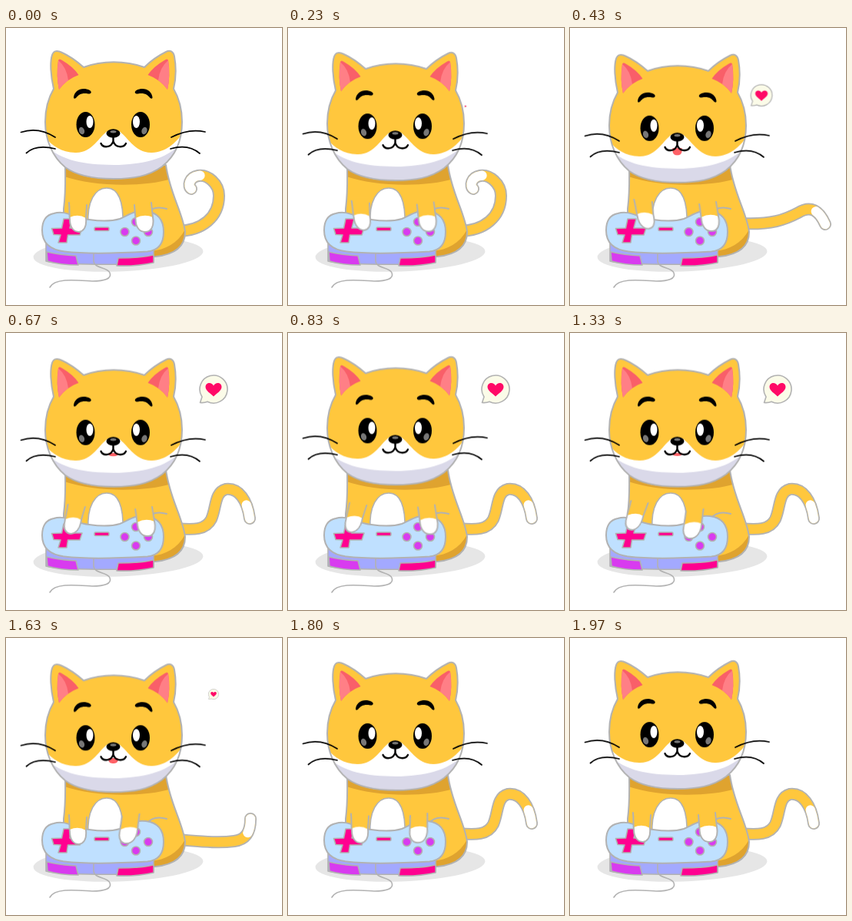
Recreate the animation shown at these times as an HTML page. Size 359 px wide and 360 px high, loop 2.01 s.

```html
<!DOCTYPE html>
<html lang="en">
<head>
<meta charset="utf-8">
<title>Cat playing a game</title>
<style>
  html, body { margin: 0; width: 100%; height: 100%; overflow: hidden; background: #fff; }
  svg { display: block; width: 100vw; height: 100vh; }

  .line { fill: none; stroke: #b2b2b2; stroke-width: 2; stroke-linecap: round; stroke-linejoin: round; }
  .ink { fill: none; stroke: #000; stroke-width: 1.7; stroke-linecap: round; stroke-linejoin: round; }
  .fur { fill: #ffc73d; }
  .shade { fill: #dfa32f; }
  .white { fill: #fff; }
  .edge { stroke: #b2b2b2; stroke-width: 1.6; stroke-linejoin: round; }
  .pink { fill: #ff0090; }
  .violet { fill: #d83bef; }
  .shell { fill: #bfe0ff; stroke: #b2b2b2; stroke-width: 2; }

  /* Head nods twice per loop; the mouth opens near the bottom of each nod. */
  .head { animation: nod 1005ms cubic-bezier(.37, 0, .63, 1) infinite; }
  @keyframes nod { 50% { transform: translateY(5px); } }
  .tongue { transform-origin: 139px 153px; animation: open 1005ms cubic-bezier(.37, 0, .63, 1) infinite; }
  @keyframes open {
    0%, 20%, 80%, 100% { transform: scaleY(0); }
    50% { transform: scaleY(1); }
  }

  .paw { animation: 2010ms ease-in-out infinite; }
  .paw.left { transform-origin: 94px 225px; animation-name: press-left; }
  .paw.right { transform-origin: 180px 225px; animation-name: press-right; }
  @keyframes press-left {
    0%, 98%, 100% { transform: translate(0, 0) skewX(0deg); }
    21.4% { transform: translate(1px, -4px) skewX(9deg); }
    33.3% { transform: translate(-1px, -4px) skewX(-13deg); }
    51.2%, 66.2% { transform: translate(-2px, -9px) skewX(-17deg); }
    81.1% { transform: translate(0, 3px) skewX(0deg); }
  }
  @keyframes press-right {
    0%, 98%, 100% { transform: translate(0, 0) skewX(0deg); }
    21.4%, 33.3% { transform: translate(1px, -1px) skewX(3deg); }
    51.2% { transform: translate(3px, -7px) skewX(3deg); }
    66.2%, 81.1% { transform: translate(-15px, 2px) skewX(-13deg); }
  }

  /* Tail poses swap hard: curl, wave, arch, low, arch, low, arch. */
  .tail { visibility: hidden; animation: 2010ms step-end infinite; }
  .tail path { fill: none; stroke-linecap: round; }
  .tail .rim { stroke: #b2b2b2; stroke-width: 16; }
  .tail .hair { stroke: #ffc73d; stroke-width: 12.4; }
  .tail .tip { stroke: #fff; stroke-width: 12.4; }
  .curl { animation-name: curl; }
  .wave { animation-name: wave; }
  .arch { animation-name: arch; }
  .low { animation-name: low; }
  @keyframes curl { 0% { visibility: visible; } 14.29%, 100% { visibility: hidden; } }
  @keyframes wave { 0% { visibility: hidden; } 14.29% { visibility: visible; } 28.57%, 100% { visibility: hidden; } }
  @keyframes arch {
    0%, 42.86%, 71.43% { visibility: hidden; }
    28.57%, 57.14%, 85.71%, 100% { visibility: visible; }
  }
  @keyframes low {
    0%, 57.14%, 85.71%, 100% { visibility: hidden; }
    42.86%, 71.43% { visibility: visible; }
  }

  .bubble { animation: bubble 2010ms linear infinite; }
  @keyframes bubble {
    0%, 10% { transform: translate(228px, 104px) scale(0); }
    21.4% { transform: translate(249px, 87.500px) scale(.77); }
    32%, 72% { transform: translate(270px, 73px) scale(1); }
    81.1% { transform: translate(270px, 73px) scale(.37); }
    86%, 100% { transform: translate(270px, 73px) scale(0); }
  }
</style>
</head>
<body>
<svg viewBox="0 0 359 360" preserveAspectRatio="none">
  <defs>
    <path id="body" d="M77 178C77 200 78 212 75 235V280C100 297 160 299 195 297C222 294 233 283 233 265C230 240 213 215 208 178Z"/>
    <path id="skull" d="M62 79C58 62 57 44 60 35C62 29 67 29 73 32C84 37 93 44 101 51C125 42 155 42 180 51C188 43 198 36 208 31C214 28 218 31 219 37C221 48 222 62 218 79C225 91 229 106 229 122C229 145 222 165 203 180C185 193 165 196 140 196C112 196 92 192 77 181C60 167 51 145 51 122C51 106 55 91 62 79Z"/>
    <clipPath id="in-body"><use href="#body"/></clipPath>
    <clipPath id="in-skull"><use href="#skull"/></clipPath>
  </defs>

  <ellipse cx="146" cy="294" rx="110.500" ry="22.500" fill="#e6e6e6" transform="rotate(-2 146 294)"/>

  <g id="tails"></g>

  <g>
    <use href="#body" class="fur"/>
    <g clip-path="url(#in-body)" class="shade">
      <path d="M70 175H215V196C180 207 110 207 70 191Z"/>
      <path d="M236 256C226 278 210 288 188 290V302H240Z"/>
    </g>
    <use href="#body" class="line"/>
    <path class="line" d="M183 241Q192 230 209 235"/>
    <path class="white edge" d="M107 256C105 225 116 208 131 208C146 208 153 225 152 256Z"/>
  </g>

  <g>
    <path fill="#a3a9ff" class="edge" d="M52 280V303C70 308 170 309 192 304V280Z"/>
    <path class="violet edge" d="M53 291Q70 295 91 296L94 308Q70 308 54 303Z"/>
    <path class="pink edge" d="M146 299Q175 299 192 295V305Q170 310 144 309Z"/>
    <path class="shell" d="M62 241C78 236 88 247 108 249C122 251 138 251 148 248C160 243 168 236 182 238C198 240 205 250 205 265C205 280 199 289 184 290.500C150 292.500 105 294 76 290.500C56 288 47 278 47 263C47 251 52 243 62 241Z"/>
    <path class="pink edge" d="M75 248H86L83 260H99L96 269H80.500L79 279H68L71 269L62 268.500L59.500 260.500L72.500 260Z"/>
    <rect class="pink edge" x="115" y="259" width="19" height="4.500" rx="1.500"/>
    <g class="violet edge">
      <circle cx="169" cy="252" r="5.500"/>
      <circle cx="154.500" cy="265" r="5.500"/>
      <circle cx="185" cy="265" r="5.500"/>
      <circle cx="169" cy="276.500" r="5.500"/>
    </g>
    <path class="line" style="stroke-width:1.6" d="M114 293V303C115 313 131 310 135 318C138 326 128 329 112 329C94 328 64 324 57 337"/>
  </g>

  <g class="paw left">
    <path class="fur" d="M82 223V250H104.500V223Z"/>
    <path class="white" d="M83 246Q94 241 104 247C105 257 102 265 95 265C86 265 82 257 83 246Z"/>
    <path class="line" d="M82 227C83 238 82 243 83 249C83 259 88 265 95 265C102 264 105 257 104 247L105 230"/>
  </g>
  <g class="paw right">
    <path class="fur" d="M167.500 223L168.500 250H191L189 223Z"/>
    <path class="white" d="M168.500 247Q180 241 191 246C193 256 189 265 181 265C173 265 168.500 257 168.500 247Z"/>
    <path class="line" d="M167 230L168.500 248C168.500 258 173 265 181 265C189 265 193 257 191 246L189 227"/>
  </g>

  <g class="head">
    <use href="#skull" class="fur"/>
    <g clip-path="url(#in-skull)">
      <path class="white" d="M48 138C58 152 70 161 90 162C112 163 122 140 132 134Q139 131 147 134C157 140 168 163 190 162C210 161 222 148 232 134V200H48Z"/>
      <path fill="#dad9e9" d="M48 150C70 172 100 178 140 178C180 177 208 171 232 147V200H48Z"/>
    </g>
    <use href="#skull" class="line"/>

    <g id="ear">
      <path fill="#f95f69" d="M68 42Q69 39 73 42Q87 50 94.500 61Q78 67 69 80Q65 62 68 42Z"/>
      <path fill="#ff7f86" d="M68 42Q79 51 81 68Q74 73 69 80Q65 62 68 42Z"/>
    </g>
    <use href="#ear" transform="matrix(-1 0 0 1 279 0)"/>

    <g id="brow-eye">
      <path d="M88 90C89 81 99 76 109 81C112 83 111 86 107 85.500C99 84 95 86 91 91C89 92 88 92 88 90Z"/>
      <ellipse cx="103.500" cy="125.500" rx="12" ry="16.500"/>
      <ellipse class="white" cx="109" cy="122" rx="4.500" ry="8"/>
      <ellipse fill="#777" cx="98.500" cy="133.500" rx="3.500" ry="4.800" transform="rotate(-20 98.500 133.500)"/>
    </g>
    <use href="#brow-eye" transform="matrix(-1 0 0 1 278.500 0)"/>

    <path class="tongue" fill="#ff6268" d="M133.500 151H145.500V156C145 164 134 164 133.500 156Z"/>
    <path class="ink" style="stroke-width:2.4" d="M123.500 150C126 156 137 156 139.500 147C142 156 153 156 156 150M139.500 141V147"/>
    <ellipse cx="139.500" cy="137" rx="9" ry="5.800"/>
    <ellipse fill="#777" cx="139.500" cy="134.800" rx="4" ry="1.700"/>

    <path class="ink" d="M19.500 135.500Q42 128 64 142M26.500 162.500Q39 151 64 157M215 142Q238 130 259 135M214 157Q237 150 252 163"/>
  </g>

  <g class="bubble">
    <path fill="#fbfbe8" class="edge" d="M-15 10L-17.500 17.500Q-12 18 -8 16.200A18 18 0 1 0 -15 10Z"/>
    <path fill="#ff0a66" d="M0 9.500C-4 5.500 -10.500 2 -10.500 -3C-10.500 -9 -2.500 -10 0 -4.500C2.500 -10 10.500 -9 10.500 -3C10.500 2 4 5.500 0 9.500Z"/>
  </g>
</svg>
<script>
  // Each pose: centre line of the tail and the percentage that stays yellow.
  const poses = {
    curl: ["M222 264C256 264 277 245 277 218C277 202 262 190 250 192C238 194 236 206 241 209", 82],
    wave: ["M222 254C262 256 280 249 297 240C313 230 324 237 332 255", 83],
    arch: ["M222 254C244 256 260 256 267 242C274 226 271 207 286 203C303 201 314 218 317 241", 88],
    low: ["M222 262C250 264 275 267 297 264C312 262 318 252 318 235", 84]
  };

  document.getElementById("tails").innerHTML = Object.entries(poses).map(([name, [d, start]]) => `
    <g class="tail ${name}">
      <path class="rim" d="${d}"/>
      <path class="hair" d="${d}"/>
      <path class="tip" d="${d}" pathLength="100" stroke-dasharray="${100 - start} 200" stroke-dashoffset="${-start}"/>
    </g>`).join("");
</script>
</body>
</html>
```
